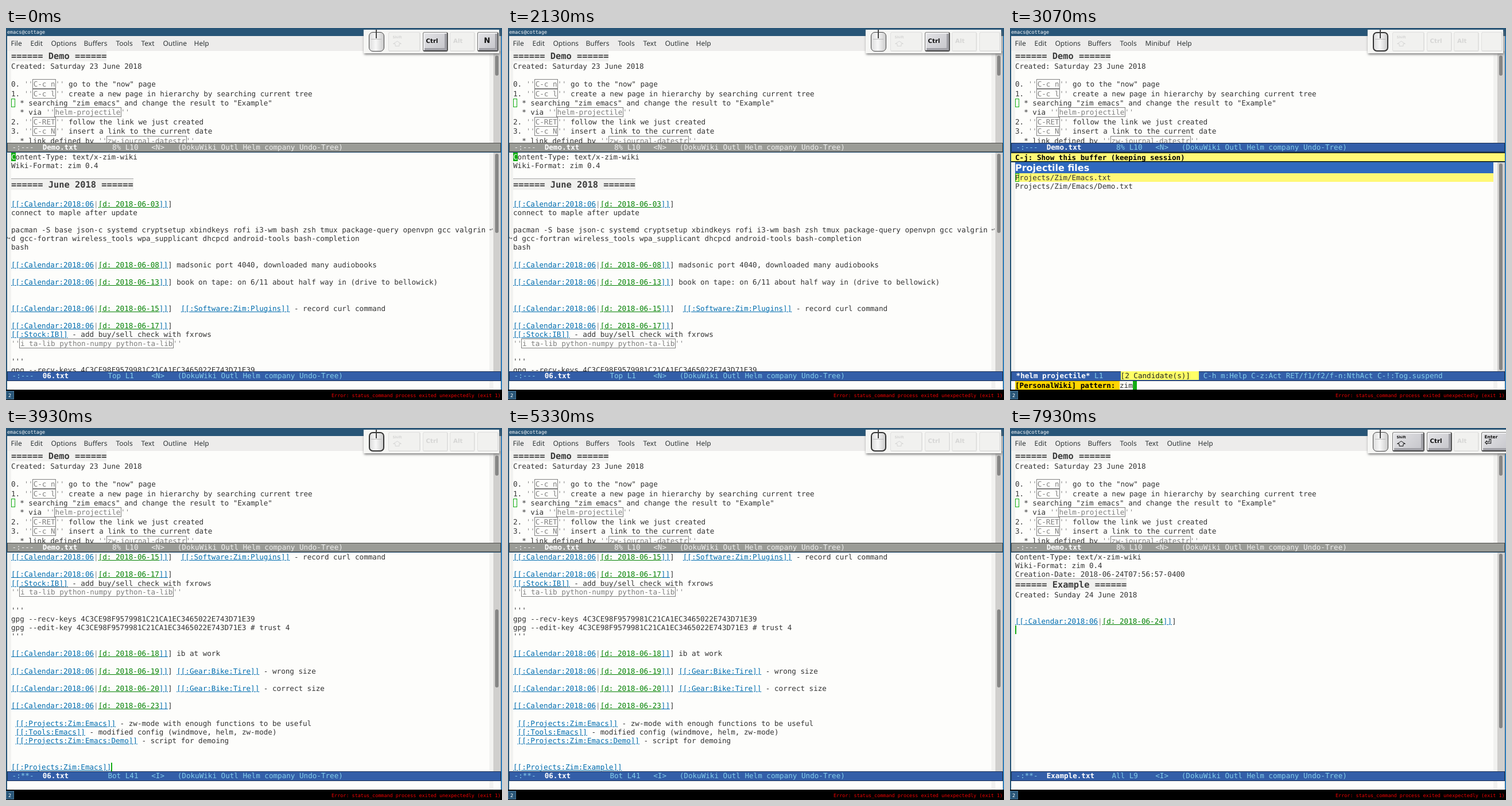
These frames come from a looping animation (864x648 px, 8000 ms). An HTML page:

```html
<!DOCTYPE html>
<html lang="en">
<head>
<meta charset="utf-8">
<title>Wiki demo</title>
<style>
html, body { margin: 0; width: 100%; height: 100%; overflow: hidden; }
body { text-rendering: geometricPrecision; }
#stage { position: absolute; width: 864px; height: 648px; overflow: hidden; background: #000; }
#stage, p { font: 12.6px "DejaVu Sans Mono", monospace; color: #333; }
div { position: absolute; box-sizing: border-box; white-space: pre; line-height: 15.18px; }
p { margin: 0; height: 15.18px; line-height: 15.18px; }
p.boxed { padding: .76px 0; }
p.head { height: 20.9px; line-height: 20.9px; font-size: 15.37px; font-weight: bold; color: #3c3c3c; }
.head span { background: #f0f0ee; border-top: 1px solid #a7a7a7; padding-top: 1px; }
p.source { height: 19.3px; background: #2f69bf; color: #fff; font: bold 16px/19.3px "DejaVu Sans", sans-serif; }
p.pick { background: #fff876; }
u { color: #006daf; text-underline-offset: 1px; text-decoration-thickness: 1px; }
u.date, .path { color: #008000; }
i { font-style: normal; color: #888; }
i.code { outline: 1px solid #7f7f7f; padding: 0 .75px; color: #7f7f7f; }
.pane { background: #fdfdfb; overflow: hidden; }
.mode { border: 1px solid #4e4e4c; background: #9b9c97; color: #f0f0ef; padding-left: 7.6px; line-height: 14.5px; }
.mode.on { border-color: #1a2f54; background: #335ea8; color: #85ceeb; }
.mode b { color: #fff; }
.mode mark { background: #ffff66; color: #222; }
.small { font-size: 8.45px; line-height: 12px; color: #fff; }
.menu { font: 12px/18px "Noto Sans", sans-serif; color: #2e3436; }
.wrap { font-size: 10px; color: #555; }
.key { border: solid #e0e0df; border-width: 1px 2px 2px 1px; border-radius: 3px; background: #f1f1ef; color: #d6d6d5;
  font: bold 10.3px "DejaVu Sans", sans-serif; }
.key.on { border-color: #888 #555 #444 #777; background: linear-gradient(135deg, #e4e4e7, #c4c4c9); color: #111;
  box-shadow: inset 2px 2px #efeff0, inset -4px -4px #a0a0a6; }
</style>
</head>
<body>
<div id="stage"></div>
<script>
const CHAR = 7.585, ROW = 15.18, LOOP = 8000;
const stage = document.getElementById('stage');

const box = (x, y, w, h, style = '', content = '', cls = '') =>
  `<div class="${cls}" style="left:${x}px;top:${y}px;width:${w}px;height:${h}px;${style}">${content}</div>`;

// Wiki markup: @dd is a dated calendar link, ''x'' is code, [[:x]] is a link.
const markup = s => s
  .replace(/''(.+?)''/g, "<i>''</i><i class=code>$1</i><i>''</i>")
  .replace(/\[\[:[\w:]+\]\]/g, '<u>$&</u>')
  .replace(/@(\d\d)/g, '<u>[[:Calendar:2018:06</u><i>|</i><u class=date>[d: 2018-06-$1</u><u>]]</u>]');

const row = s => {
  if (s[0] === '=') return `<p class=head><span>${s}</span></p>`;
  if (s[0] === '#') return `<p class=source>${s.slice(1)}</p>`;
  if (s[0] === '>') return `<p class=pick>${s.slice(1)}</p>`;
  return `<p${/''.+''/.test(s) ? ' class=boxed' : ''}>${markup(s)}</p>`;
};

const demoRows = `====== Demo ======
Created: Saturday 23 June 2018

0. ''C-c n'' go to the "now" page
1. ''C-c l'' create a new page in hierarchy by searching current tree
  * searching "zim emacs" and change the result to "Example"
  * via ''helm-projectile''
2. ''C-RET'' follow the link we just created
3. ''C-c N'' insert a link to the current date
  * link defined by ''zw-journal-datestr''`;

const shared = `@15  [[:Software:Zim:Plugins]] - record curl command

@17
[[:Stock:IB]] - add buy/sell check with fxrows
''i ta-lib python-numpy python-ta-lib''

'''
gpg --recv-keys 4C3CE98F9579981C21CA1EC3465022E743D71E39
`;

const topRows = `Content-Type: text/x-zim-wiki
Wiki-Format: zim 0.4

====== June 2018 ======

@03
connect to maple after update

pacman -S base json-c systemd cryptsetup xbindkeys rofi i3-wm bash zsh tmux package-query openvpn gcc valgrin
d gcc-fortran wireless_tools wpa_supplicant dhcpcd android-tools bash-completion
bash

@08 madsonic port 4040, downloaded many audiobooks

@13 book on tape: on 6/11 about half way in (drive to bellowick)


${shared}`;

const bottomRows = `${shared}gpg --edit-key 4C3CE98F9579981C21CA1EC3465022E743D71E3 # trust 4
'''

@18 ib at work

@19 [[:Gear:Bike:Tire]] - wrong size

@20 [[:Gear:Bike:Tire]] - correct size

@23

 [[:Projects:Zim:Emacs]] - zw-mode with enough functions to be useful
 [[:Tools:Emacs]] - modified config (windmove, helm, zw-mode)
 [[:Projects:Zim:Emacs:Demo]] - script for demoing


`;

const newRows = `Content-Type: text/x-zim-wiki
Wiki-Format: zim 0.4
Creation-Date: 2018-06-24T07:56:57-0400
====== Example ======
Created: Sunday 24 June 2018
`;

const weeks = [37, 39, 40, 41, 42, 45, 48].map(n => `Calendar/2016/Week_${n}.txt`).join('\n');
const allFiles = `#Project buffers
><u style="text-decoration:none">Demo.txt</u>${' '.repeat(20)}<i>1.3k</i>${' '.repeat(10)}DokuWiki  <span class=path>(in \`~/notes/PersonalWiki/Projects/Zim/Emacs/')</span>

#Projectile files
Apps.txt
Apps/AndroidLangauges.txt
Apps/txtlz.txt
Blog.txt
Bluetooth.txt
Bluetooth.txt.zim-new~
Body/IronMan.txt
Body/IronMan/BikeTraining.txt
Body/Soccer.txt
Body/Soccer/Indoor2018.txt
Books.txt
Books/Saga.txt
Calendar.txt
${weeks}`;
const foundFiles = `#Projectile files
>Projects/Zim/Emacs.txt
Projects/Zim/Emacs/Demo.txt`;

// Each event changes part of the state from its time on.
const events = [
  [0, { view: 'top', mode: 'N', mod: 'C', key: 'N', cursor: 1, pattern: '', files: allFiles, echo: '', line: 6, dated: 0 }],
  [600, { cursor: 0 }], [670, { mod: '', key: '' }],
  [1070, { cursor: 1 }], [1600, { cursor: 0 }], [2070, { cursor: 1 }],
  [2130, { mod: 'C' }], [2200, { key: 'C' }], [2330, { mod: 'SC', key: 'L' }],
  [2470, { view: 'helm' }], [2600, { mod: '', key: '' }],
  [2670, { key: 'Z', pattern: 'z' }], [2730, { key: 'I', pattern: 'zi' }],
  [2800, { key: 'M', pattern: 'zim' }], [2870, { key: '' }], [2930, { files: foundFiles }],
  [3400, { key: 'E', pattern: 'zim e' }], [3470, { key: 'M', pattern: 'zim em' }],
  [3600, { key: 'Enter' }],
  [3670, { view: 'bottom', mode: 'I', page: 'Emacs', caret: 23 }], [3870, { key: '' }],
  [4000, { caret: 22 }], [4070, { caret: 21 }],
  ...[4130, 4200, 4270, 4330].map((t, i) => [t, { page: 'Emacs'.slice(0, 4 - i), caret: 20 - i }]),
  ...[4470, 4530, 4670, 4730, 4800, 4930].map((t, i) =>
    [t, { page: 'Example'.slice(0, i + 2), caret: 18 + i, key: 'XAMPLE'[i] }]),
  [5200, { key: '' }], [5330, { cursor: 0 }], [5800, { cursor: 1 }],
  [5870, { mode: 'N' }], [5930, { mod: 'C' }], [6070, { key: 'Enter' }],
  [6130, { view: 'new', echo: '(New file)' }], [6330, { mod: '', key: '' }], [6400, { cursor: 0 }],
  [6930, { cursor: 1, key: 'O', echo: '' }], [7000, { mode: 'I', line: 7 }],
  [7070, { line: 8 }], [7130, { key: '' }],
  [7470, { mod: 'C' }], [7530, { key: 'C' }], [7670, { mod: 'SC', key: 'N' }],
  [7800, { dated: 1 }], [7930, { key: 'Enter', line: 9 }]
];

const pane = (y, bottom, rows, from, to, shift = 0) =>
  box(2, y, 860, bottom - y, 'background:#f2f2f0') +
  box(8.5, y, 833.5, bottom - y, '', `<div style="top:${shift}px;width:100%;left:.5px">${rows.split('\n').map(row).join('')}</div>`, 'pane') +
  box(849, y, 13, bottom - y, 'background:#d0cfcd') +
  box(852, from, 6, to - from, 'background:#868685;border-radius:3px');

const modeLine = (y, text, on) => box(2, y, 860, 16.7, '', text, 'mode' + (on ? ' on' : ''));
const status = (flags, name, at, line, mode) =>
  `-:${flags}-  <b>${name}</b>${' '.repeat(15 - name.length)}${at} ${('L' + line).padEnd(6)}&lt;${mode}&gt;   (DokuWiki Outl Helm company Undo-Tree)`;

const cursor = (s, x, y, char = '') => s.cursor
  ? box(x, y, s.mode === 'N' ? 7.6 : 2, 15, 'background:#12ad12;color:#fdfdfb;overflow:hidden', char) : '';
const hollow = y => box(8.5, y, 7.6, 15, 'border:1px solid #12ad12');

function lowerWindow(s) {
  if (s.view === 'helm') return modeLine(199.8, status('--', 'Demo.txt', ' 8%', 10, 'N'), 1) +
    pane(234, 598, s.files, 236, s.files === allFiles ? 315 : 596) + hollow(253) +
    box(2, 217, 860, 16, 'background:#fff876;border:solid #000;border-width:1px 0;padding-left:7px;color:#000;font-weight:bold;line-height:16px',
      'C-j: Show this buffer (keeping session)') +
    modeLine(598.3, `<b>*helm projectile*</b> L1    <mark>[${s.files === allFiles ? '1 Buffer' : '2 Candidate'}(s)]  </mark> C-h m:Help C-z:Act RET/f1/f2/f-n:NthAct C-!:Tog.suspend`, 1) +
    box(9, 615, 24 * CHAR, 15, 'background:#ffd500;color:#000;font-weight:bold', '[PersonalWiki] pattern: ') +
    box(9 + 24 * CHAR, 615, 200, 15, '', s.pattern) +
    box(9 + (24 + s.pattern.length) * CHAR, 615, 7.6, 15, 'background:#12ad12');

  const upper = modeLine(199.8, status('--', 'Demo.txt', ' 8%', 10, 'N'), 0);
  const echo = box(9, 615, 833, 15, '', s.echo);
  if (s.view === 'top') return upper + pane(217, 598, topRows, 219, 357) +
    box(842, 344, 8, 15, '', '↩', 'wrap') + box(1.5, 359, 8, 15, '', '↪', 'wrap') +
    cursor(s, 9, 217, 'C') + modeLine(598.3, status('--', '06.txt', 'Top', 1, s.mode), 1);
  if (s.view === 'bottom') return upper + pane(217, 598, `${bottomRows}[[:Projects:Zim:${s.page}]]`, 316, 452) +
    cursor(s, 9 + s.caret * CHAR, 582.8) + modeLine(598.3, status('**', '06.txt', 'Bot', 41, s.mode), 1);
  return upper + pane(217, 598, newRows + (s.dated ? '\n\n@24' : ''), 219, s.dated ? 523 : 537) +
    cursor(s, 9, 298.6 + (s.line - 6) * ROW) +
    modeLine(598.3, status('**', 'Example.txt', 'All', s.line, s.mode), 1) + echo;
}

const keyCap = (x, w, on, label) => box(x, 7, w, 33.5, '', label, 'key' + (on ? ' on' : ''));
const word = (x, y, text, size) => box(x, y, 40, 12, `font-size:${size}px;line-height:12px`, text);
const shiftArrow = '<svg style="position:absolute;left:6px;top:14px" width="17" height="11" fill="none" stroke="currentColor"><path d="M8.5 1L15.5 5.5H12V9.5H5V5.5H1.5Z"/></svg>';

function keyPanel({ mod, key }) {
  const idle = !mod && !key, enter = key === 'Enter';
  const label = enter ? word(5, 2, 'Enter', 7.5) + word(5, 11, '⏎', 15)
    : word(11, 9, key, 13);
  return box(623, 3, enter ? 250 : 236, 41, 'background:#f6f6f4;box-shadow:1px 2px 4px #777') +
    box(631.5, 6.5, 27, 34, `border:${idle ? '2px solid #333' : '1px solid #444'};border-radius:7px;background:linear-gradient(90deg,#ddd,#f7f7f7 45%,#ccc)`) +
    box(636, 19, 18, 1, 'background:#bbb') + box(644, 3, 2, 15, 'background:#444') +
    keyCap(665.5, 56, mod.includes('S'), word(7, 3, 'Shift', 6) + shiftArrow) +
    keyCap(725.5, 44, mod.includes('C'), word(5, 9, 'Ctrl', 10.3)) +
    keyCap(773, 44, false, word(5, 9, 'Alt', 10.3)) +
    keyCap(820.5, enter ? 56 : 37, key, label);
}

function picture(s) {
  const menu = [[9, 'File'], [43, 'Edit'], [79, 'Options'], [136, 'Buffers'], [192, 'Tools'],
    ...(s.view === 'helm' ? [[236, 'Minibuf'], [291, 'Help']] : [[236, 'Text'], [274, 'Outline'], [328, 'Help']])];
  return box(0, 0, 864, 630, 'background:#285577') +
    box(862.5, 14, 1.5, 616, 'background:#2e9ef4') +
    box(2, 1, 200, 12, '', 'emacs@cottage', 'small') +
    pane(39, 200, demoRows, 48, 83, -.5) + hollow(123.3) +
    box(2, 14, 860, 25.5, 'background:#edeceb') +
    menu.map(([x, name]) => box(x - .5, 18, 70, 18, '', name, 'menu')).join('') +
    box(2, 615, 840, 15, 'background:#fdfdfb') + box(842, 615, 20, 15, 'background:linear-gradient(90deg,#f2f2f0 7px,#fdfdfb 7px)') +
    lowerWindow(s) +
    box(0, 630, 864, 18, 'background:#000') +
    box(0, 632, 14, 15, 'background:#285577;border:1px solid #4c7899') +
    box(4, 634, 10, 12, '', '2', 'small') +
    box(567, 634, 297, 12, 'color:#f00000', 'Error: status_command process exited unexpectedly (exit 1)', 'small') +
    keyPanel(s);
}

const start = performance.now();
let shown = '';
function draw() {
  const t = (performance.now() - start) % LOOP;
  const state = Object.assign({}, ...events.filter(e => e[0] <= t).map(e => e[1]));
  const html = picture(state);
  if (html !== shown) stage.innerHTML = shown = html;
  requestAnimationFrame(draw);
}
draw();
</script>
</body>
</html>
```
